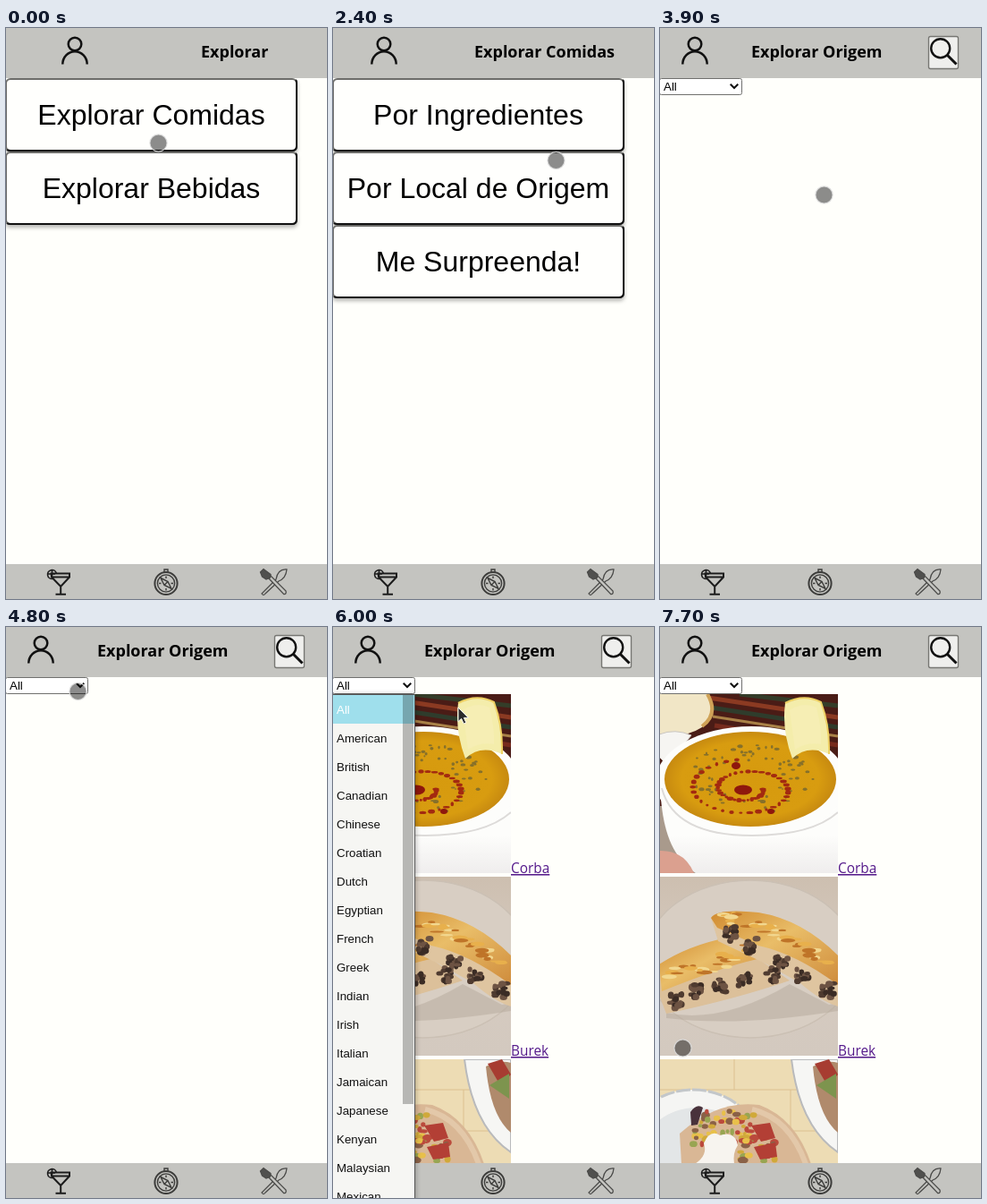
Recreate the animation shown at these times as an HTML page. Size 359 px wide and 638 px high, loop 8 s.

```html
<!DOCTYPE html>
<html lang="pt">
<head>
<meta charset="utf-8">
<title>Explorar</title>
<style>
  html, body { margin: 0; width: 100%; height: 100%; overflow: hidden; background: #fffffb; }
  svg { display: block; }
  #stage { width: 100%; height: 100%; }
  .title { font: bold 18px "Open Sans", sans-serif; }
  .btn { filter: drop-shadow(0 3px 2px rgba(0, 0, 0, .28)); }
  .btn text { font: 32px "Liberation Sans", Arial, sans-serif; text-anchor: middle; }
  .small { font: 13.33px "Liberation Sans", Arial, sans-serif; }
  .link { font: 500 15.4px "Open Sans", sans-serif; fill: #551a8b; }
  #menu { filter: drop-shadow(0 1px 3px rgba(0, 0, 0, .35)); }
</style>
</head>
<body>
<svg id="stage" viewBox="0 0 359 638" preserveAspectRatio="none">
  <defs>
    <radialGradient id="broth">
      <stop offset="0" stop-color="#d69a0e"/><stop offset=".8" stop-color="#d89c10"/><stop offset="1" stop-color="#c78a10"/>
    </radialGradient>
    <linearGradient id="bowl" x2="0" y2="1">
      <stop offset=".6" stop-color="#fdfdfb"/><stop offset="1" stop-color="#eeecec"/>
    </linearGradient>
    <linearGradient id="plate" x2="0" y2="1">
      <stop offset="0" stop-color="#cdbfb0"/><stop offset=".5" stop-color="#d6cbc0"/><stop offset="1" stop-color="#d3c9bf"/>
    </linearGradient>
    <linearGradient id="crust" x2="1" y2="1">
      <stop offset="0" stop-color="#d08a30"/><stop offset=".45" stop-color="#e9bd68"/><stop offset="1" stop-color="#cf8c3c"/>
    </linearGradient>
  </defs>
  <rect width="359" height="638" fill="#fffffb"/>

  <g id="home"></g>
  <g id="foods"></g>

  <g id="results">
    <svg x="-1" y="75" width="200" height="200">
      <rect width="200" height="200" fill="#4a1c16"/>
      <g fill="none" stroke-width="5">
        <path d="M55 4L200 26" stroke="#8b3a22"/>
        <path d="M58 15L200 37" stroke="#2f3c2c"/>
        <path d="M60 25L200 47" stroke="#a98147" stroke-width="3"/>
        <path d="M90 0L200 13" stroke="#343d29"/>
        <path d="M62 35L200 57" stroke="#772b1d"/>
      </g>
      <path d="M0 0H56Q66 22 48 37Q28 50 0 44z" fill="#f1e6c6"/>
      <path d="M54 0Q67 22 48 36" fill="none" stroke="#cfa257" stroke-width="4"/>
      <path d="M0 125H60V200H0z" fill="#a99a8c"/>
      <path d="M0 45Q18 38 36 46L10 80L0 70z" fill="#f6f5f2" stroke="#c9c5c0"/>
      <path d="M1 90C1 145 12 185 46 203H203V90z" fill="url(#bowl)"/>
      <ellipse cx="103" cy="98" rx="107" ry="62" fill="#fdfdfb"/>
      <path d="M3 105C14 148 60 158 104 158S180 150 200 132" fill="none" stroke="#dddbd9" stroke-width="2"/>
      <ellipse cx="102" cy="95" rx="96" ry="53" fill="url(#broth)"/>
      <g id="spice"></g>
      <path d="M0 175Q28 174 39 200H0z" fill="#dba08f"/>
      <path d="M141 10Q162 -1 181 9Q191 35 190 67Q166 56 149 72Q137 40 141 10z" fill="#f4edab"/>
      <path d="M141 10Q162 -1 181 9Q191 35 190 67" fill="none" stroke="#eed163" stroke-width="2"/>
      <path d="M146 18Q162 8 176 15Q182 38 181 56Q165 53 152 62z" fill="#f6eeb4"/>
    </svg>
    <text class="link" x="199" y="275" text-decoration="underline">Corba</text>

    <svg x="-1" y="279" width="200" height="200">
      <rect width="200" height="200" fill="url(#plate)"/>
      <ellipse cx="102" cy="92" rx="118" ry="88" fill="#d8cec3" stroke="#cbc0b4" stroke-width="1.5"/>
      <path d="M8 152Q70 165 146 120L190 143L200 141V150Q90 168 8 158z" fill="#b5a99c" opacity=".5"/>
      <path d="M0 99Q30 78 76 69L114 94L146 116Q85 137 8 153L0 132z" fill="#dcc09a"/>
      <path d="M0 98Q32 77 76 68L110 92Q70 101 3 128z" fill="url(#crust)"/>
      <path d="M58 46Q65 35 111 40Q160 48 200 88V145Q181 139 158 119L119 97L66 72z" fill="#dfc5a0"/>
      <path d="M58 46Q65 35 111 40Q160 48 200 88V121Q153 86 111 77L65 57z" fill="url(#crust)"/>
      <g id="meat"></g>
    </svg>
    <text class="link" x="199" y="479" text-decoration="underline">Burek</text>

    <svg x="-1" y="483" width="200" height="117">
      <rect width="200" height="117" fill="#eddcb4"/>
      <path d="M0 34H200M84 0V34M147 34V80M107 80H200" stroke="#dcc08f" fill="none"/>
      <ellipse cx="38" cy="98" rx="74" ry="64" fill="#f5f5f3" stroke="#c3c7ca" stroke-width="3" stroke-dasharray="16 2"/>
      <ellipse cx="42" cy="104" rx="60" ry="50" fill="#e3e6e7"/>
      <path d="M148 0H200V104Q157 75 148 0z" fill="#f6f6f4" stroke="#b9babc" stroke-width="2"/>
      <path d="M172 8Q188 0 200 4V82Q177 63 172 8z" fill="#b08a6c"/>
      <path d="M174 5L190 0L200 17L188 29z" fill="#a73c31"/>
      <path d="M176 29L198 16V44z" fill="#7d944e"/>
      <path d="M23 83Q65 45 112 51Q153 66 170 117H25z" fill="#d9b795"/>
      <path d="M104 56Q146 66 164 117" fill="none" stroke="#e8d0b2" stroke-width="6" opacity=".7"/>
      <g id="filling"></g>
      <path d="M50 94Q57 78 68 85Q85 80 88 96Q82 105 84 117H40Q55 107 50 94z" fill="#f7f4ef"/>
    </svg>
  </g>

  <rect width="359" height="56" fill="#c4c4c0"/>
  <rect y="599" width="359" height="39" fill="#c4c4c0"/>
  <g id="person" fill="none" stroke="#111" stroke-width="2.5">
    <circle cx="15" cy="18" r="7.3"/>
    <path d="M1.3 40.5A13.7 14.3 0 0 1 28.7 40.5"/>
  </g>
  <text id="title" class="title" y="33"></text>

  <g fill="none" stroke="#1c1c1c" stroke-width="2">
    <path d="M52 615.5A5 5 0 1 1 56.3 609M47 610H55M51.5 605V614" stroke-width="1.6"/>
    <path d="M50.5 609.5H71V613.5L61.2 624L51 613.5zM51 613.5H71M61.2 624V632M55.5 632.8H67"/>
  </g>
  <g fill="none" stroke="#3c3c3a" stroke-width="1.4">
    <circle cx="179" cy="620.5" r="12.6" stroke-width="2"/>
    <circle cx="179" cy="620.5" r="9.6"/>
    <path d="M177 608V605H181V608M179 612.5V615M179 626V628.5M171 620.5H173.5M184.5 620.5H187"/>
    <path d="M173 614.5L181 618.5L185 626.5L177 622.5zM181 618.5L177 622.5"/>
  </g>
  <g fill="#c4c4c0" stroke="#4a4a48" stroke-width="1.3">
    <path d="M302 616L286 632Q288 635 290 632L305 618Q313 615 314 605Q304 604 302 616z"/>
    <path d="M293 614L310.5 632.5Q314 633 313 629L296 612z"/>
    <path d="M284.5 608L288 604.5L296 610.5L295.5 614L291 616L286.5 613z" fill="#50504e"/>
  </g>

  <g id="origin">
    <rect x="300.5" y="9.5" width="33" height="36" rx="2" fill="#efefed" stroke="#777773" stroke-width="1.4"/>
    <g fill="none" stroke="#111" stroke-width="2.4">
      <circle cx="313.7" cy="22.7" r="10.5"/>
      <path d="M321 30L331.5 40.5" stroke-width="3"/>
    </g>
    <rect id="select" x="-.5" y="56.5" height="18" rx="2" fill="#fff" stroke="#70706e"/>
    <text class="small" x="4" y="70">All</text>
    <path id="chevron" d="M-4.3 -2L0 2.2L4.3 -2" fill="none" stroke="#111" stroke-width="2"/>
  </g>

  <g id="menu">
    <rect x="-1" y="75.5" width="92.5" height="570" fill="#f6f6f3" stroke="#555"/>
    <rect y="76" width="91" height="32" fill="#9fdfec"/>
    <rect x="78" y="76" width="12" height="457" fill-opacity=".26"/>
  </g>

  <circle id="dot" r="9.6" fill-opacity=".45" stroke="#ddd" stroke-opacity=".85" stroke-width="1.2"/>
  <path id="arrow" d="M0 0V15.6L3.6 12.4L6.2 18L8.8 16.8L6.4 11.4H11.3z" fill="#2b2b2b" stroke="#f4f4f2"/>
</svg>

<script>
const LOOP = 8000, STEP = 100;
const $ = id => document.getElementById(id);
const show = (id, on) => $(id).setAttribute("display", on ? "inline" : "none");
const move = (id, x, y) => $(id).setAttribute("transform", `translate(${x} ${y})`);

let seed = 7;
const rand = (a, b) => {
  seed = (seed * 16807) % 2147483647;
  return a + (b - a) * seed / 2147483647;
};
const blob = (x, y, r, color, ry = r) =>
  `<ellipse cx="${x.toFixed(1)}" cy="${y.toFixed(1)}" rx="${r.toFixed(1)}" ry="${ry.toFixed(1)}" fill="${color}"/>`;
const repeat = (n, fn) => Array.from({ length: n }, (_, i) => fn(i)).join("");

const button = (label, i) => {
  const y = 56 + 82 * i;
  return `<g class="btn">
    <rect x="0" y="${y + 1}" width="325" height="80" rx="5" fill="#fffffd" stroke="#6d6d6a" stroke-width="2"/>
    <path fill="none" stroke="#111" stroke-width="2" d="M1 ${y + 80}Q2 ${y + 81} 5 ${y + 81}H320Q325 ${y + 81} 325 ${y + 76}V${y + 5}Q325 ${y + 3} 324 ${y + 2}"/>
    <text x="162.5" y="${y + 52}">${label}</text></g>`;
};
$("home").innerHTML = ["Explorar Comidas", "Explorar Bebidas"].map(button).join("");
$("foods").innerHTML = ["Por Ingredientes", "Por Local de Origem", "Me Surpreenda!"].map(button).join("");

const countries = "All American British Canadian Chinese Croatian Dutch Egyptian French Greek Indian Irish Italian Jamaican Japanese Kenyan Malaysian Mexican";
$("menu").innerHTML += countries.split(" ").map((name, i) =>
  `<text class="small" x="4" y="${97 + 32 * i}" fill="${i ? "#111" : "#fff"}">${name}</text>`).join("");

// Herbs scattered on the broth, then a spiral of red oil.
$("spice").innerHTML =
  repeat(75, () => {
    const a = rand(0, 2 * Math.PI), d = rand(.45, .85);
    return blob(100 + 88 * d * Math.cos(a), 95 + 46 * d * Math.sin(a), rand(1, 3.2), "#86702a", rand(.8, 2));
  }) +
  repeat(58, i => {
    const a = i * .19, d = 18 + i * .85;
    return blob(98 + d * Math.cos(a), 106 + d * .5 * Math.sin(a), rand(1.5, 4), "#a32a10", rand(1.2, 2.6));
  }) + blob(94, 107, 10, "#8e170d", 5.5) + blob(86, 80, 5, "#8e170d", 4) + blob(125, 131, 4, "#8e170d", 3);

const mince = (x, y) => repeat(14, i =>
  blob(x + rand(-7, 7), y + rand(-8, 8), rand(2.5, 4.5), ["#4f3b30", "#6d5343", "#3b2c25"][i % 3], rand(2, 4)));
const toasted = (n, x, y, dx, dy, spread) => repeat(n, i => {
  const k = rand(0, 1);
  return blob(x + dx * k, y + dy * k * k + rand(-spread, spread), rand(3, 9), ["#f2d78f", "#bf7428", "#e8b04c"][i % 3], rand(1, 3));
});
$("meat").innerHTML = toasted(36, 68, 47, 122, 54, 7) + toasted(24, 10, 106, 88, -24, 9) +
  [[80, 64], [103, 77], [137, 97], [160, 110], [189, 127],
    [19, 139], [43, 128], [68, 122], [94, 115], [126, 109]].map(p => mince(...p)).join("");

const mix = ["#d0a93a", "#98a552", "#bb4a3c", "#e8c04a", "#8a6147"];
$("filling").innerHTML =
  repeat(55, i => blob(rand(38, 107), rand(58, 96), rand(2, 5), mix[i % 5], rand(2, 4))) +
  repeat(30, i => blob(rand(88, 130), rand(82, 117), rand(3, 6), mix[i % 5], rand(2, 4))) +
  `<path d="M103 74L124 71L130 88L114 92zM106 98L130 93L132 109L113 112z" fill="#b33f35"/>
   <path d="M35 59Q42 49 49 54L43 73L36 74z" fill="#49323b"/>`;

// Pointer stops: time, x, y
const path = [
  [0, 170.5, 128.5], [100, 170.5, 128.5], [600, 266, 44.5], [700, 266, 44.5],
  [1300, 161, 94], [1400, 161, 93], [1500, 160, 95], [1900, 160, 95],
  [2200, 314, 126], [2400, 249.5, 148], [2500, 249.5, 148], [3200, 192, 186],
  [3800, 193, 186.5], [3900, 183.5, 186.5], [4100, 129, 167], [4200, 129, 167],
  [4600, 80, 80], [4700, 80, 80], [4800, 80.5, 72], [5000, 80.5, 72],
  [5100, 80, 64], [5900, 80, 64], [6000, 140, 90], [6100, 184, 150],
  [6200, 130, 202], [6300, 75, 180], [6400, 45, 143], [6500, 45, 143],
  [6900, 40, 387], [7100, 18, 445], [7300, 25, 474], [7600, 25, 474],
  [7700, 25.5, 470.5], [LOOP, 25.5, 470.5]
];
function pointer(t) {
  const i = path.findIndex(p => p[0] > t);
  const [t0, x0, y0] = path[i - 1], [t1, x1, y1] = path[i];
  const k = (t - t0) / (t1 - t0);
  return [x0 + (x1 - x0) * k, y0 + (y1 - y0) * k];
}

const pages = [
  { text: "Explorar", x: 218, icon: 62 },
  { text: "Explorar Comidas", x: 158, icon: 42 },
  { text: "Explorar Origem", x: 102, icon: 24 }
];

function draw(time) {
  const t = Math.floor((time % LOOP) / STEP) * STEP;
  const n = t < 1500 ? 0 : t < 3500 ? 1 : 2;
  const page = pages[n];
  $("title").textContent = page.text;
  $("title").setAttribute("x", page.x);
  move("person", page.icon, 0);
  show("home", n === 0);
  show("foods", n === 1);
  show("origin", n === 2);
  show("results", t >= 5000);
  show("menu", t >= 5300 && t < 7600);

  const width = t < 3700 ? 36 : 92;
  $("select").setAttribute("width", width);
  move("chevron", width - 9, 64.8);

  const mouse = t === 1400 || (t >= 5100 && t < 7700);
  show("arrow", mouse);
  show("dot", !mouse);
  move(mouse ? "arrow" : "dot", ...pointer(t));
}

const start = performance.now();
function tick() {
  draw(performance.now() - start);
  requestAnimationFrame(tick);
}
tick();
</script>
</body>
</html>
```
